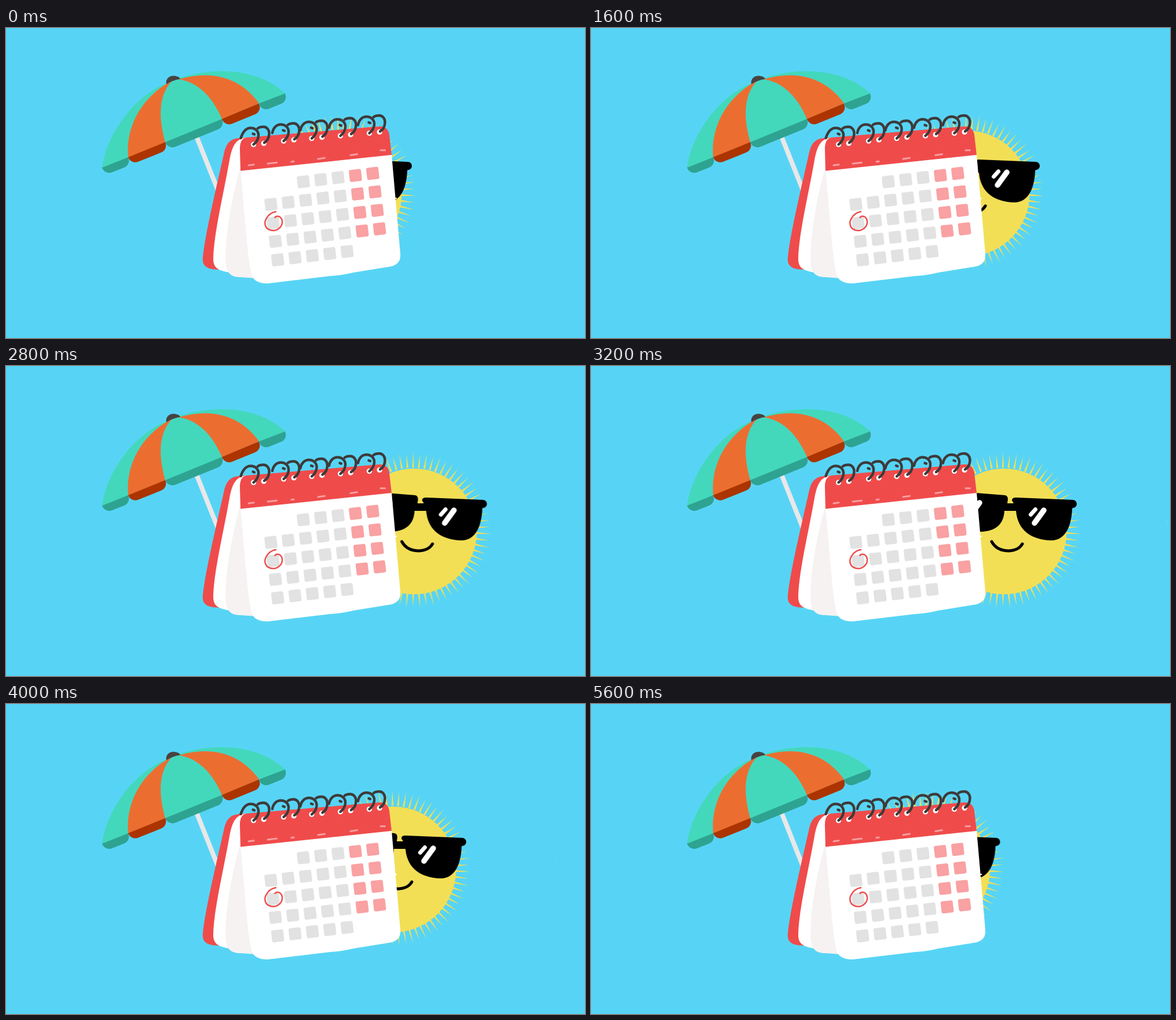
Animation, 1000 px wide and 535 px high, one loop 5700 ms. Source, as an HTML page:

```html
<!DOCTYPE html>
<html lang="en">
<head>
<meta charset="utf-8">
<title>Sunny calendar</title>
<style>
  html, body { margin: 0; width: 100%; height: 100%; overflow: hidden; background: #57d4f5; }
  svg { display: block; width: 100vw; height: 100vh; }
  .line { fill: none; stroke-linecap: round; stroke-linejoin: round; }
  #sun { animation: peek 5700ms -1ms infinite; }
  /* 3.1 s out, 2.6 s back, moving ten times a second */
  @keyframes peek {
    0% { transform: translateX(-138px); animation-timing-function: steps(31); }
    54.386% { transform: translateX(5.5px); animation-timing-function: steps(26); }
    100% { transform: translateX(-138px); }
  }
</style>
</head>
<body>
<svg viewBox="0 0 1000 535" xmlns="http://www.w3.org/2000/svg">
  <g id="umbrella">
    <path d="M328.500 186L382 320" stroke="#e8e8e8" stroke-width="8"/>
    <g id="skirts"></g>
    <g fill="#43d8bc">
      <path d="M166 241C172 190 215 120 280 94L278 96C222 130 207 185 211 223Z"/>
      <path d="M437 130C405 85 355 72 300 88L300 86C365 65 440 72 482 113Z"/>
      <path d="M275 197C262 150 265 115 286 92L296 88C328 92 355 115 373 157Z"/>
    </g>
    <g fill="#eb6e30">
      <path d="M211 223C207 185 222 130 278 96L286 92C265 115 262 150 275 197Z"/>
      <path d="M373 157C355 115 328 92 296 88L300 88C355 72 405 85 437 130Z"/>
    </g>
    <path d="M277 97C275 88 282 82 290 82.500C296 83 300 85 301 88Q288 90 277 97Z" fill="#474342"/>
  </g>

  <g id="sun">
    <path id="rays" fill="#f1df55"/>
    <ellipse cx="713" cy="285.500" rx="108.500" ry="108.500" fill="#f3df56"/>
    <circle cx="995" cy="269" r=".8" fill="#b5d98f"/>
    <path d="M600 214L664 219L715 223Q720 224 720 230L719 237H730L727 232Q727 227 734 227L832 231A7 7 0 0 1 832 245L831 246C830 275 820 301 795 301C762 300 737 285 734 250H714C713 272 700 285 674 286C640 286 618 265 616 232L600 228Z"/>
    <g class="line" stroke="#fff">
      <path d="M767.500 247.500L759.500 256.500" stroke-width="7"/>
      <path d="M782 249L766 271M671 236L655 258" stroke-width="9.500"/>
    </g>
    <path class="line" d="M692 303C699 316 710 319 722 319C735 318 741 314 745 307" stroke="#000" stroke-width="5"/>
  </g>

  <g id="calendar">
    <path d="M412 189C388 190 382 196 377 214C365 268 345 350 340 395C338 412 348 417 371 417L420 300Z" fill="#f04b4b"/>
    <path d="M414 189C397 192 391 202 386 228C375 290 360 350 358 396C357 416 368 419 392 423L430 400Z" fill="#fff"/>
    <path d="M405 240C392 285 380 345 379 396C379 420 385 430 405 430L432 432Z" fill="#f6f2f2"/>
    <path d="M405 245L666 218L681 389Q683 407 665 411.500L600 422Q580 427 560 428L455 440.500C438 442 428 436 425 428C418 405 415 350 405 245Z" fill="#fff"/>
    <rect x="672" y="293" width="3" height="2" fill="#fff"/>
    <path d="M405 246.500L404 212Q403 191 415 189L642 170Q659 168 662 184L666 219Z" fill="#f04b4b"/>
    <path class="line" d="M419 237L428 235.800M452 234L467.500 232.300M493 230.800L497 230.200M539 226L550.500 224.300M595 219.500L606.500 217.700M647 211H654.500" stroke="#f79ea0" stroke-width="3"/>
    <g id="days"></g>
    <path class="line" d="M466 317C453 319 446 332 447.500 339C449 347 456 350 463 349.500C472 348 478 341 477 333C475.500 324 467 323 464.500 327" stroke="#ef4b4b" stroke-width="2.500"/>
    <g id="rings"></g>
  </g>
</svg>
<script>
  const add = (parent, tag, attrs) => {
    const el = document.createElementNS("http://www.w3.org/2000/svg", tag);
    for (const name in attrs) el.setAttribute(name, attrs[name]);
    return document.getElementById(parent).appendChild(el);
  };

  // Scalloped hem, laid out along the slanted lower edge of the canopy
  const hemX = [166, 211, 275, 373, 437, 482];
  const slope = -128 / 316, stretch = Math.hypot(1, slope);
  hemX.slice(0, -1).forEach((x, i) => {
    const length = (hemX[i + 1] - x) * stretch;
    add("skirts", "path", {
      d: `M0 -1H${length}V1A13 13 0 0 1 ${length - 13} 14H13A13 13 0 0 1 0 1Z`,
      transform: `translate(${x} ${241 + (x - 166) * slope}) rotate(${Math.atan(slope) * 180 / Math.PI})`,
      fill: i % 2 ? "#ab3400" : "#2ea391"
    });
  });

  const rayCount = 70;
  const polar = (radius, angle) =>
    `${(711.5 + radius * Math.sin(angle)).toFixed(1)} ${(283.5 - radius * Math.cos(angle)).toFixed(1)}`;
  let rayPath = "";
  for (let i = 0; i < rayCount; i++) {
    const angle = i * 2 * Math.PI / rayCount;
    rayPath += `M${polar(108, angle - .016)}L${polar(i % 2 ? 132 : 134.5, angle)}L${polar(108, angle + .016)}Z`;
  }
  document.getElementById("rays").setAttribute("d", rayPath);

  for (let row = 0; row < 5; row++) {
    for (let col = row ? 0 : 2; col < (row < 4 ? 7 : 5); col++) {
      const x = 453.6 + 29.97 * col + 3.9 * row;
      const y = 272.5 - 3.6 * col + 31.9 * row;
      add("days", "rect", {
        x: -10.5, y: -10.5, width: 21, height: 21, rx: 3,
        transform: `translate(${x} ${y}) rotate(-6.5)`,
        fill: col > 4 ? "#f9a1a3" : "#e2e2e2"
      });
    }
  }

  // Position of the left hole of each ring pair
  [[427.5, 201], [479.5, 195], [528, 190.5], [577.5, 186], [627.5, 181.5]].forEach(([x, y], i) => {
    const transform = `translate(${x} ${y})`;
    for (const [cx, cy] of [[0, 0], [17.7, -2]])
      add("rings", "circle", { cx, cy, r: 4.6, fill: "#fff", transform });
    const start = i ? "-19.500 -14" : "-22 -11";
    add("rings", "path", {
      class: "line", transform, stroke: "#3e3a3a", "stroke-width": 4.4,
      d: `M${start}C-18 -23 -12 -28.500 -5 -28.500C4 -28.500 9.500 -22 8.500 -14C7.500 -7 4 -3 0 0` +
         "M7.500 -28C10 -30 14 -30.500 17 -30.500C23 -30.500 27.500 -25 27 -18C26.500 -10 22 -5 18.500 -3M-1 -18.500L1.500 -17.500"
    });
  });
</script>
</body>
</html>
```
